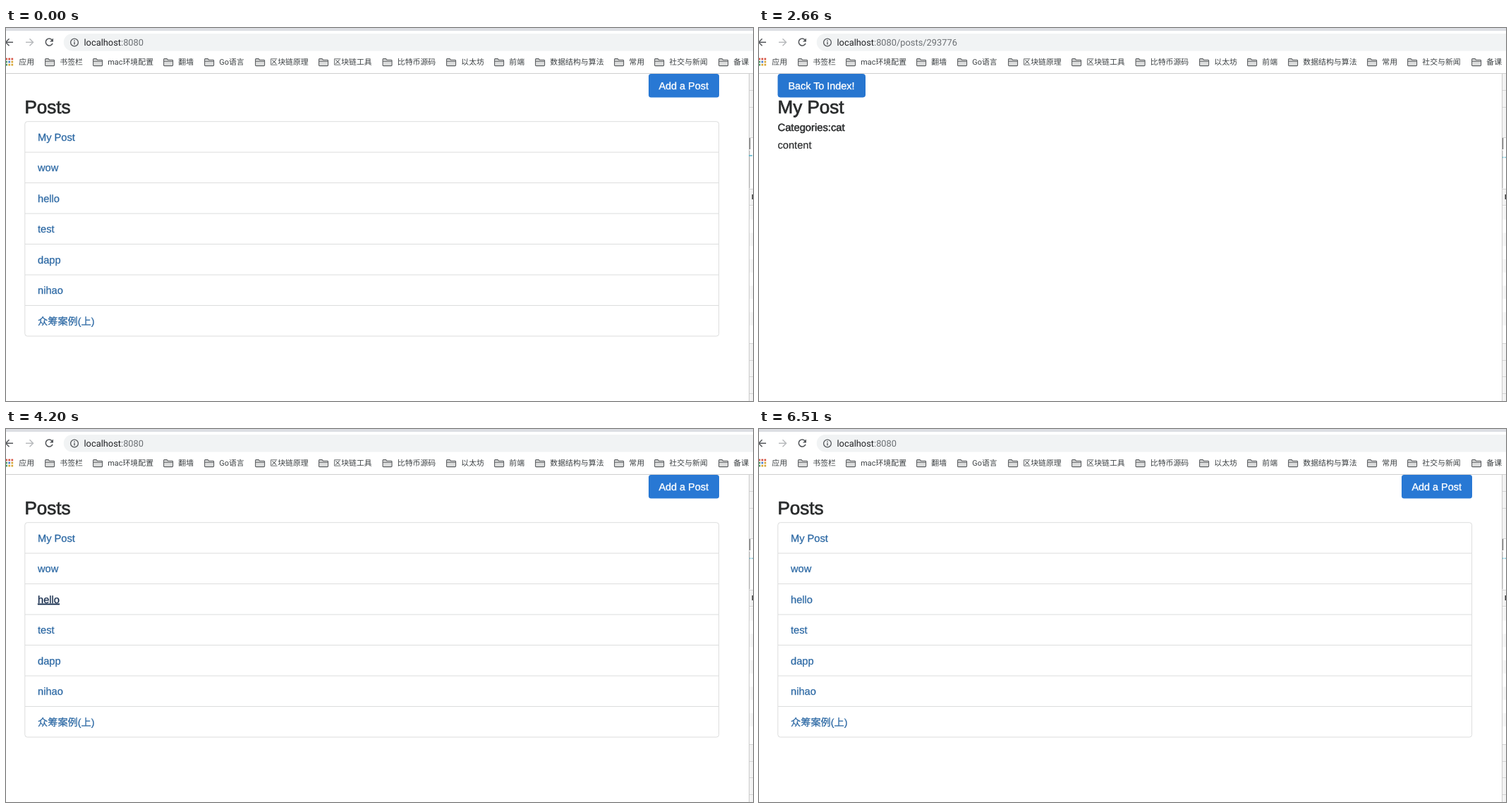
Animation, 1059 px wide and 529 px high, one loop 6720 ms. Source, as an HTML page:

```html
<!DOCTYPE html>
<html lang="zh">
<head>
<meta charset="utf-8">
<style>
html, body { margin: 0; width: 100%; height: 100%; overflow: hidden; background: #fff; }
svg { display: block; width: 100%; height: 100%; }
text { font: 14.65px "Liberation Sans", "Noto Sans CJK SC", sans-serif; fill: #292b2c; white-space: pre; text-rendering: geometricPrecision; }
.bar text { font: 10.9px Roboto, "Noto Sans CJK SC", sans-serif; fill: #3c4043; }
.bar .url { font-size: 12.85px; fill: #202124; }
.url tspan { fill: #6b6f73; }
.title { font-size: 26px; stroke: #292b2c; stroke-width: .7; }
.medium { font-size: 14.75px; stroke: #292b2c; stroke-width: .5; }
.body { stroke: #292b2c; stroke-width: .2; }
.link { fill: #2a67a3; stroke: #2a67a3; stroke-width: .25; }
.hover { fill: #12294a; stroke: #12294a; text-decoration: underline; }
.label { fill: #fff; stroke: #fff; stroke-width: .35; text-anchor: middle; font-size: 14.4px; }
</style>
</head>
<body>
<svg viewBox="0 0 1059 529" preserveAspectRatio="none">
  <g class="bar">
    <path d="M0 0H1059V4H0Z" fill="#dcdee3"/>
    <path d="M1059 8H94a12.2 12.2 0 0 0 0 24.5H1059Z" fill="#f1f3f4"/>
    <path d="M10 20.2H0M4.5 15.2L-.5 20.2L4.5 25.2" fill="none" stroke="#55585c" stroke-width="1.5"/>
    <path d="M28 20.2H38.5M33.5 15.2L38.5 20.2L33.5 25.2" fill="none" stroke="#b9bbbe" stroke-width="1.5"/>
    <path d="M65.3 17A5 5 0 1 0 66 21.7" fill="none" stroke="#55585c" stroke-width="1.6"/>
    <path d="M67 14.5V19.5H62Z" fill="#55585c"/>
    <circle cx="97" cy="20.5" r="5.4" fill="none" stroke="#55585c" stroke-width="1.3"/>
    <path d="M97 19.7V23.5M97 17.3V18.7" stroke="#55585c" stroke-width="1.4"/>
    <text class="url" x="110.5" y="24.7">localhost<tspan id="path"></tspan></text>
    <g id="marks"></g>
    <path d="M0 64.5H1059" stroke="#cfcfcf"/>
  </g>
  <g id="index">
    <text class="title" x="26.5" y="120.7">Posts</text>
    <rect x="911" y="65" width="100" height="33.5" rx="3.5" fill="#2878d4"/>
    <text class="label" x="960.7" y="87">Add a Post</text>
    <rect x="26.8" y="132.7" width="983.8" height="304.3" rx="3.5" fill="none" stroke="#dcdddd"/>
    <g id="list"></g>
  </g>
  <g id="post">
    <rect id="back" x="27" y="65.5" width="123.5" height="32.5" rx="3"/>
    <text class="label" x="88.5" y="87">Back To Index!</text>
    <text class="title" id="title" x="26.5" y="120.7"></text>
    <text class="medium" id="cat" x="26.5" y="145.7"></text>
    <text class="body" id="content" x="26.5" y="170.6"></text>
  </g>
  <g id="panel">
    <path d="M1054 65H1059V155H1054ZM1054 228H1059V251H1054ZM1054 447H1059V529H1054Z" fill="#f3f3f3"/>
    <path d="M1054 88.5h5m-5 24h5m-5 43h5m-5 73h5m-5 23h5m-5 196h5m-5 24h5m-5 23h5m-5 24h5" fill="none" stroke="#d4d4d4"/>
    <path d="M1053.5 65V529" stroke="#cbcbcb"/>
    <path d="M1054.5 156V172" stroke="#777" stroke-width="1.5"/>
    <path d="M1054 174V227" stroke="#aaa"/>
    <path d="M1058.3 236V243" stroke="#333" stroke-width="1.4"/>
    <path id="trace" fill="none" stroke="#55b4cc" stroke-width="1.5"/>
  </g>
</svg>
<script>
const LOOP = 6720;
const $ = id => document.getElementById(id);
function add(parent, tag, attrs, text = '') {
  const el = document.createElementNS('http://www.w3.org/2000/svg', tag);
  for (const k in attrs) el.setAttribute(k, attrs[k]);
  el.textContent = text;
  return parent.appendChild(el);
}

// Bookmarks bar
const marks = [[55, '书签栏'], [123, 'mac环境配置'], [223, '翻墙'], [281, 'Go语言'], [353, '区块链原理'],
  [443, '区块链工具'], [533.5, '比特币源码'], [624, '以太坊'], [692, '前端'], [750, '数据结构与算法'],
  [862, '常用'], [919, '社交与新闻'], [1010, '备课']];
const dots = ['#d65545', '#d65545', '#d65545', '#4b9a60', '#4b80d0', '#d8a83c', '#4b9a60', '#d8a83c', '#d8a83c'];
dots.forEach((fill, i) => add($('marks'), 'rect',
  { x: -.8 + i % 3 * 4.1, y: 42.6 + Math.floor(i / 3) * 4.1, width: 2.7, height: 2.7, fill }));
add($('marks'), 'text', { x: 18.3, y: 52.4 }, '应用');
for (const [x, name] of marks) {
  add($('marks'), 'path', { transform: `translate(${x} 43)`, fill: '#dcdddd', stroke: '#5c5f62', 'stroke-width': 1.1,
    d: 'M.6 10V1.6Q.6.6 1.6.6H5L6.5 2.2H12.6Q13.6 2.2 13.6 3.2V9.6Q13.6 10.6 12.6 10.6H1.6Q.6 10.6.6 10ZM.6 4.2H13.6' });
  add($('marks'), 'text', { x: x + 21.3, y: 52.4 }, name);
}

// Post list
const links = ['My Post', 'wow', 'hello', 'test', 'dapp', 'nihao', '众筹案例(上)'].map((name, i) => {
  const y = 132.7 + 43.47 * i;
  if (i) add($('list'), 'path', { d: `M27 ${y}H1010.5`, stroke: '#dcdddd' });
  return add($('list'), 'text', { class: 'link', x: 45, y: y + 27.1 }, name);
});
links[6].style.fontSize = '14.2px';

// Striped rows in the side panel
for (let y = 253; y < 440; y += 37.5)
  add($('panel'), 'rect', { x: 1054, y, width: 5, height: 18.7, fill: '#f5f5f5' });

const visits = [
  { link: 0, over: 1890, open: 2240, hover: 2625, press: 2910, close: 3290,
    id: 293776, title: 'My Post', cat: 'cat', content: 'content' },
  { link: 2, over: 3990, open: 4270, hover: 5305, press: 5505, close: 5880,
    id: 293814, title: 'hello', cat: 'greeting', content: 'hello' }
];

const fade = (t, start) => {
  const p = Math.min(1, Math.max(0, (t - start) / 200));
  return p * p * (3 - 2 * p);
};
const mix = (a, b, p) => a.map((v, i) => v + (b[i] - v) * p);
const rgb = c => `rgb(${c.map(Math.round)})`;
const shade = (t, v, base, hover, active) =>
  rgb(mix(mix(base, hover, fade(t, v.hover)), active, fade(t, v.press)));

function draw(t) {
  const post = visits.find(v => t >= v.open && t < v.close);
  const over = visits.find(v => t >= v.over && t < v.open);
  $('index').style.display = post ? 'none' : '';
  $('post').style.display = post ? '' : 'none';
  $('path').textContent = ':8080' + (post ? '/posts/' + post.id : '');
  links.forEach((l, i) => l.classList.toggle('hover', !!over && over.link === i));
  $('trace').setAttribute('d', t < 2240 ? 'M1053 181H1058' : 'M1054 183.5H1055.5M1057 183.5H1058.5');
  if (!post) return;
  $('title').textContent = post.title;
  $('cat').textContent = 'Categories:' + post.cat;
  $('content').textContent = post.content;
  $('back').setAttribute('fill', shade(t, post, [40, 120, 212], [30, 94, 165], [22, 74, 130]));
  $('back').setAttribute('stroke', shade(t, post, [40, 120, 212], [26, 86, 153], [12, 50, 92]));
}

const start = performance.now();
function tick() {
  draw((performance.now() - start) % LOOP);
  requestAnimationFrame(tick);
}
tick();
</script>
</body>
</html>
```
